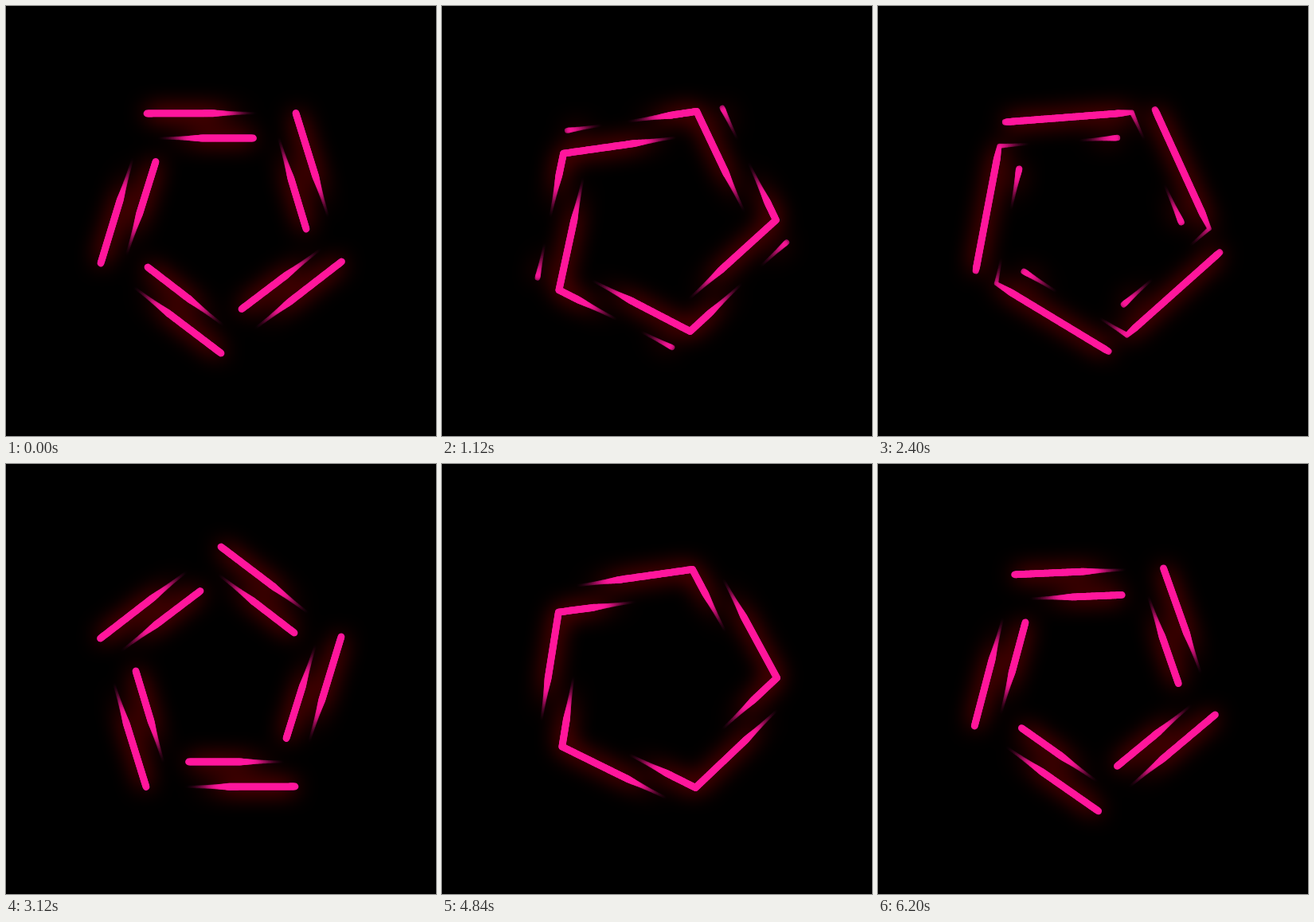
An HTML page with a canvas for the animation above (6.24 s loop, 540 by 540 pixels).

```html
<!DOCTYPE html>
<html lang="en">
<head>
<meta charset="utf-8">
<title>Neon pentagon</title>
<style>
  html, body { margin: 0; width: 100%; height: 100%; overflow: hidden; background: #000; }
  canvas { position: absolute; left: 0; top: 0; width: 540px; height: 540px; }
  #glow { filter: blur(14px); }
  #tubes { filter: blur(0.5px); }
</style>
</head>
<body>
<canvas id="glow" width="540" height="540"></canvas>
<canvas id="tubes" width="540" height="540"></canvas>
<script>
const LOOP = 6240, STEP = 40;
const CENTER = 270, WIDTH = 8.8, PIECE = 2;
const PINK = [255, 22, 156];

// A light pulse runs from the inner to the outer tip of each arm, twice a loop.
// Its front moves faster than its back, so it grows on the way (pixels, ms).
const PULSE = LOOP / 2, FADE = 58;
const front = age => 242 - 0.099 * age;
const back = age => 342 - 0.083 * age;

// Five bent arms: outer tip, corner, inner tip (relative to the center)
const ARMS = [
  [[-93, -135], [63, -135.5], [107, 10]],
  [[94, -135.5], [143, 21.8], [26, 110.5]],
  [[151.5, 51], [25.6, 148.4], [-92, 58]],
  [[0, 166], [-127, 69.7], [-82, -74.5]],
  [[-151, 53], [-103, -104], [40.5, -104]]
];

// Cut an arm into short pieces, each with its distance from the outer tip
function cut(arm) {
  const pieces = [];
  let start = 0;
  for (let i = 0; i < 2; i++) {
    const [x, y] = arm[i], [u, v] = arm[i + 1];
    const len = Math.hypot(u - x, v - y), n = Math.round(len / PIECE);
    const at = k => [x + (u - x) * k / n, y + (v - y) * k / n];
    for (let k = 0; k < n; k++) {
      pieces.push({ a: at(k), b: at(k + 1), s: start + (k + 0.5) * len / n });
    }
    start += len;
  }
  return pieces;
}

const pieces = ARMS.flatMap(cut);
const glow = document.getElementById("glow").getContext("2d");
const tubes = document.getElementById("tubes").getContext("2d");

function pulse(s, age) {
  const outside = Math.max(0, front(age) - s, s - back(age));
  return Math.max(0, 1 - outside / FADE) ** 2;
}

function light(s, t) {
  const age = t % PULSE;
  return Math.max(pulse(s, age - PULSE), pulse(s, age), pulse(s, age + PULSE));
}

function line(ctx, { a, b }, width, color) {
  ctx.lineWidth = width;
  ctx.strokeStyle = color;
  ctx.beginPath();
  ctx.moveTo(...a);
  ctx.lineTo(...b);
  ctx.stroke();
}

function reset(ctx, angle) {
  ctx.setTransform(1, 0, 0, 1, 0, 0);
  ctx.clearRect(0, 0, 540, 540);
  ctx.translate(CENTER, CENTER);
  ctx.rotate(angle);
}

function draw(t) {
  const angle = 2 * Math.PI * t / LOOP;
  reset(glow, angle);
  reset(tubes, angle);
  tubes.lineCap = "round";
  tubes.globalCompositeOperation = "lighten";
  for (const piece of pieces) {
    const p = light(piece.s, t);
    if (p < 0.01) continue;
    line(glow, piece, 9, `rgba(220,0,0,${p})`);
    // Fading ends are drawn translucent first, so the glow shows through
    const [r, g, b] = PINK;
    line(tubes, piece, WIDTH * (0.35 + 0.65 * p), `rgba(${r},${g},${b},${p})`);
  }
}

let shown = -1;
function tick() {
  const t = Math.floor(performance.now() % LOOP / STEP) * STEP;
  if (t !== shown) draw(shown = t);
  requestAnimationFrame(tick);
}
tick();
</script>
</body>
</html>
```
